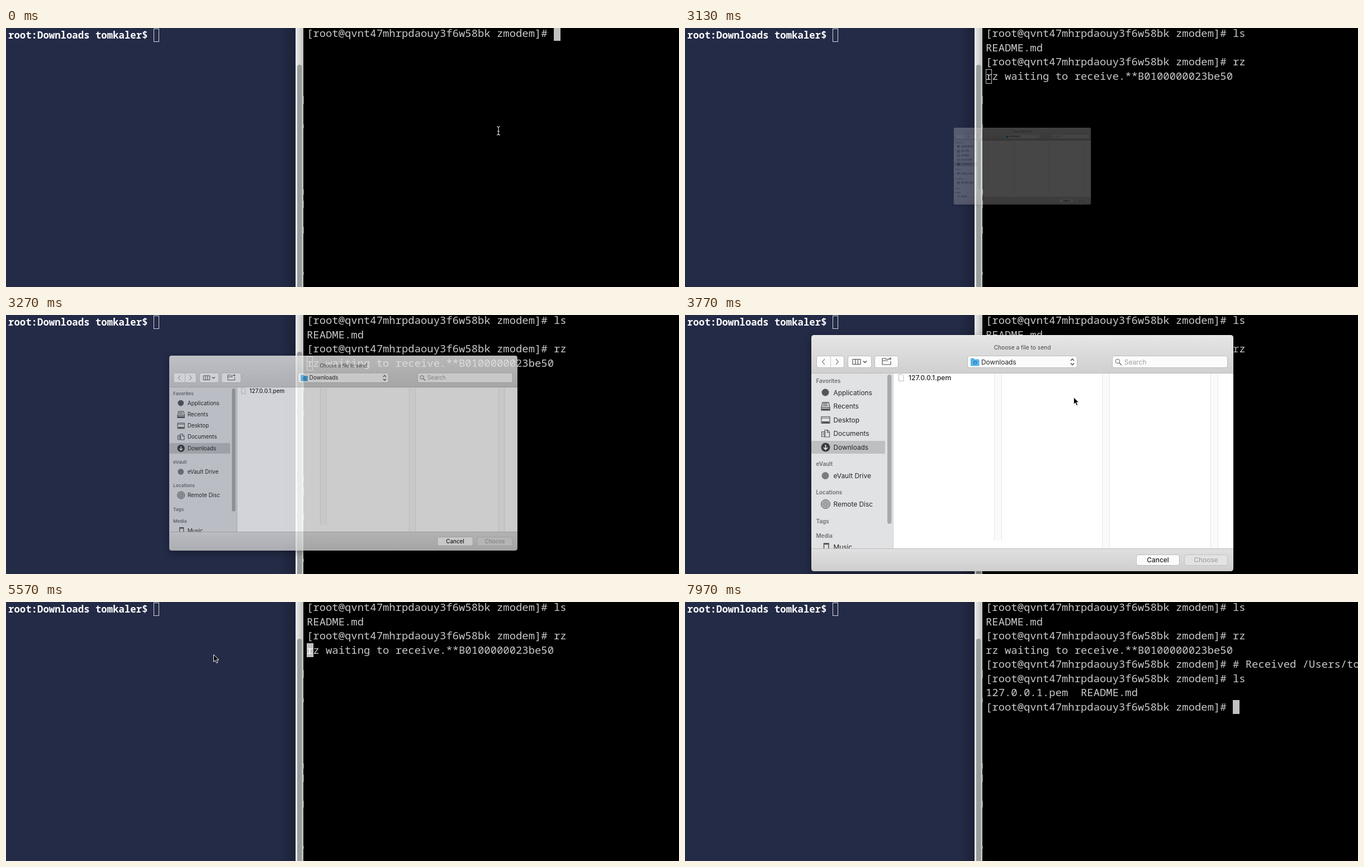
Write an HTML page that moves like this. It is 1204 px wide and 465 px high and loops after 8000 ms.

```html
<!DOCTYPE html>
<html lang="en">
<head>
<meta charset="utf-8">
<title>Sending a file to a remote shell</title>
<style>
html, body { margin: 0; width: 100%; height: 100%; overflow: hidden; background: #000; }
svg { display: block; width: 1204px; height: 465px; }
text { white-space: pre; font-family: Inter, Roboto, sans-serif; }
.mono { font-family: "Noto Sans Mono", "DejaVu Sans Mono", monospace; font-weight: 500; }
#dialog { transform-origin: 603.5px 248px; filter: drop-shadow(0 5px 8px rgba(0,0,0,.4)); }
</style>
</head>
<body>
<svg id="stage" viewBox="0 0 1204 465"></svg>
<script>
const LOOP = 8000;
const stage = document.getElementById('stage');

// Markup helpers
const rect = (x, y, w, h, fill, r = 0, stroke = 'none') =>
  `<rect x="${x}" y="${y}" width="${w}" height="${h}" rx="${r}" fill="${fill}" stroke="${stroke}"/>`;
const path = (d, stroke, width = 1, fill = 'none') =>
  `<path d="${d}" stroke="${stroke}" stroke-width="${width}" fill="${fill}"/>`;
const disc = (x, y, r, fill, stroke = 'none') =>
  `<circle cx="${x}" cy="${y}" r="${r}" fill="${fill}" stroke="${stroke}"/>`;
const text = (x, y, str, size = 11.9, fill = '#262626', weight = 400, anchor = 'start') =>
  `<text x="${x}" y="${y}" font-size="${size}" fill="${fill}" font-weight="${weight}" text-anchor="${anchor}">${str}</text>`;
const grad = (id, from, to, x2, y2) =>
  `<linearGradient id="${id}" x2="${x2}" y2="${y2}"><stop stop-color="${from}"/><stop offset="1" stop-color="${to}"/></linearGradient>`;
const button = (x, y, w, h) => rect(x + .5, y + .5, w - 1, h - 1, '#fbfbfb', 3.5, '#bcbcbc');

// Terminals
const USER = 'tomkaler';
const PROMPT = '[root@qvnt47mhrpdaouy3f6w58bk zmodem]# ';
const CHAR = 11.34, ROW = 25.5, LEFT = 538, BASE = 16.4;

const log = [
  [0, PROMPT], [700, 'l'], [900, 's'],
  [1300, '\nREADME.md\n' + PROMPT],
  [1950, 'r'], [2300, 'z'],
  [2420, '\nrz waiting to receive.**B0100000023be50\r'],
  [6200, `\n${PROMPT}# Received /Users/${USER}/Downloads/127.0.0.1.pem\n${PROMPT}`],
  [7000, 'l'], [7200, 's'],
  [7560, '\n127.0.0.1.pem  README.md\n' + PROMPT]
];

function terminals() {
  let rows = '';
  for (let i = 0; i < 8; i++)
    rows += `<text class="mono row" x="${LEFT}" y="${BASE + i * ROW}" font-size="18.9" fill="#c9c9c9"></text>`;
  return rect(0, 0, 519, 465, '#242b47') + rect(488, 0, 30, 465, 'url(#edge)') +
    `<text class="mono" x="4" y="18.8" font-size="17.33" style="font-weight:600" fill="#fff">root:Downloads ${USER}$</text>` +
    rect(264.5, 1.5, 9, 23, 'none', 0, '#d5d6dc') +
    rect(518, 0, 14, 465, 'url(#track)') + rect(521, 66, 8.5, 420, '#999c9c', 4) +
    path('M532.500 122v14M532.500 173v7M532.500 290v9M532.500 310v13M532.500 357v12M532.500 438v5', '#777') +
    `<rect id="block" height="25"/>` + rows +
    `<text id="under" class="mono" x="${LEFT}" font-size="18.9" fill="#fff"></text>`;
}

// File dialog
function sidebar() {
  const ink = '#555658';
  const heads = [['Favorites', 121.5], ['eVault', 271], ['Locations', 322], ['Tags', 373.5], ['Media', 399.5]];
  const items = [['Applications', 143.5], ['Recents', 168], ['Desktop', 192.5], ['Documents', 217],
    ['Downloads', 241.8], ['eVault Drive', 293], ['Remote Disc', 344], ['Music', 421]];
  return rect(226, 104, 147, 316, '#e1e2e4') + rect(372, 104, 1, 316, '#cfcfd1') +
    rect(226, 226, 132, 23, '#bebfc1') + rect(362, 107, 7.5, 268, '#a8a9ab', 3.7) +
    heads.map(([s, y]) => text(234.5, y, s, 9.9, '#6c6d70', 600)).join('') +
    items.map(([s, y]) => text(265.5, y, s)).join('') +
    disc(251, 139, 6.5, ink) +
    path('M246 157h11l2 9v5h-15v-5zM244 166h15M247 159.5h8M246.5 162.5h9', ink, 1.3) +
    rect(244, 168, 15, 3, ink) +
    path('M244 182.5h15v12h-15zM244 185h15', ink, 1.2) + rect(245, 191, 13, 3, ink) +
    path('M244.5 209.5h6v9h-6zM250 206.5h5l3.5 3.5v9h-8.5zM254.5 207v4h4M246 212h3M246 215h3', ink, 1.2) +
    disc(251.5, 237.5, 8, '#3b3c3e') + path('M251.5 233v8M248 238l3.5 3.5 3.5-3.5', '#e8e8e8', 1.7) +
    disc(251, 288.5, 6.5, '#7b7c7e') +
    disc(251.5, 339.5, 8, '#b3b4b6', ink) + disc(251.5, 339.5, 4.5, 'none', '#77787a') + disc(251.5, 339.5, 1.8, '#eee', ink) +
    path('M248.5 420v-10h8.5v10M248.5 411.5h8.5', ink, 1.5);
}

function toolbar() {
  return path('M226 105V41q0-5 5-5h745q5 0 5 5v64z', 'none', 0, 'url(#bar)') +
    rect(230, 36, 747, 1, '#f3f3f3') + rect(226, 104, 755, 1, '#bababa') +
    text(603.5, 61.8, 'Choose a file to send', 10.2, '#444', 400, 'middle') +
    button(235, 73, 50, 22) + rect(260, 73, 1, 22, '#c6c6c6') +
    path('M250 79l-4.5 5 4.5 5M270 79l4.5 5-4.5 5', '#848484', 1.2) +
    button(291, 73, 43, 22) + path('M300 79.5h14v9h-14zM304.7 79.5v9M309.3 79.5v9', '#4a4a4a', 1.1) +
    path('M319 82.5l3 3 3-3', '#4a4a4a', 1.4) +
    button(339, 73, 43, 22) + path('M365 79.5h-5l-1.5-1.5h-5.5v11h15v-6M353 82h10M367 76v5M364.5 78.5h5', '#4a4a4a', 1.1) +
    button(505, 73, 197, 22) +
    path('M511 79q0-1.5 1.5-1.5h4l1.5 2h7q1.5 0 1.5 1.5v9q0 1.5-1.5 1.5h-12.5q-1.5 0-1.5-1.5z', 'none', 0, '#56b4ea') +
    disc(519, 85.5, 3.4, '#2d83be') + path('M519 83.5v4M517.5 86l1.5 1.5 1.5-1.5', '#9ad8fa', .9) +
    text(530, 88.5, 'Downloads') +
    path('M690 82l3-3.2 3 3.2M690 86.5l3 3.2 3-3.2', '#4a4a4a', 1.4) +
    button(764, 73, 207, 22) + disc(774, 83, 3.8, 'none', '#606060') + path('M777 86l4 4', '#606060', 1.4) +
    text(786, 88.5, 'Search', 11.9, '#a0a0a0');
}

function columns() {
  const gutter = (x, h) => rect(x, 105, 13, h, '#fafafa') + rect(x, 105, 1, h, '#e6e6e6') + rect(x + 13, 105, 1, h, '#e6e6e6');
  const page = stroke => path('M382.5 106.5h5.5l3 3v9h-8.5z', stroke, 1, '#fff');
  const name = '127.0.0.1.pem';
  const gray = '#7b7b7b';
  return rect(373, 105, 608, 315, '#fff') + gutter(553, 300) +
    `<g id="empty">${gutter(746, 315) + gutter(940, 315)}</g>` +
    `<g id="file">${page('#b9b9b9') + text(400, 117.3, name, 12.1, '#222', 500)}</g>` +
    `<g id="chosen">` +
      rect(373, 105, 180, 16, '#0a58d2') + page('#fff') + path('M388 106.5v3h3', '#9dbbe8') +
      text(400, 117.3, name, 12.1, '#fff', 500) +
      rect(967, 105, 14, 315, '#fafafa') + rect(967, 105, 1, 315, '#e4e4e4') +
      rect(970.5, 107, 7.5, 258, '#bfbfbf', 3.7) + path('M972.5 409v7M975.5 409v7', '#a5a5a5') +
      text(766.5, 341, name, 13.9, '#262626', 400, 'middle') +
      text(767, 360, 'printable encoded archive - 2 KB', 11.2, gray, 500, 'middle') +
      text(743, 395, 'Tags', 11.2, gray, 500, 'end') + text(751, 395, 'Add Tags…', 11.2, '#bdbdbd') +
      text(743, 412, 'Created', 11.2, gray, 500, 'end') +
      text(751, 412, 'September 18, 2019 at 6:15 PM', 11.4) +
    `</g>`;
}

function footer() {
  return path('M226 420h755v35q0 5-5 5H231q-5 0-5-5z', 'none', 0, 'url(#foot)') + rect(226, 419, 755, 1, '#b9b9b9') +
    button(807, 430, 78, 20) + text(846, 444.3, 'Cancel', 11.9, '#222', 500, 'middle') +
    `<g id="off">${rect(893.5, 430.5, 77, 19, '#e3e3e3', 3.5, '#c4c4c4') + text(932, 444.3, 'Choose', 11.9, '#a4a4a4', 500, 'middle')}</g>` +
    `<g id="on">${rect(893, 430, 78, 20, 'url(#blue)', 4) + text(932, 444.3, 'Choose', 11.9, '#fff', 500, 'middle')}</g>`;
}

stage.innerHTML = '<defs>' +
  grad('edge', '#1c223800', '#1c2238', 1, 0) + grad('track', '#ececec', '#c2c2c2', 1, 0) +
  grad('bar', '#e6e6e6', '#cfcfcf', 0, 1) + grad('foot', '#e0e0e0', '#cecece', 0, 1) +
  grad('blue', '#4a90f9', '#1560ee', 0, 1) + '</defs>' + terminals() +
  `<g id="dialog">${sidebar() + columns() + toolbar() + footer()}</g>` +
  `<g id="beam">${path('M-3-7.5q3 0 3 2v11q0 2-3 2M3-7.5q-3 0-3 2v11q0 2 3 2M-2 1h4', '#ddd', 1.2)}</g>` +
  `<g id="arrow">${path('M0 0v12.8l3-2.7 2.2 4.8 2.3-1-2.2-4.7h4z', '#fff', 1, '#000')}</g>`;

const $ = id => document.getElementById(id);
const rows = [...document.querySelectorAll('.row')];
const show = (id, on) => $(id).setAttribute('display', on ? 'inline' : 'none');
const place = (id, x, y) => $(id).setAttribute('transform', `translate(${x} ${y})`);
const ramp = (t, a, b) => Math.min(1, Math.max(0, (t - a) / (b - a)));
const ease = p => p * p * (3 - 2 * p);
const mix = (a, b, p) => a + (b - a) * p;

function drawShell(t) {
  const lines = log.filter(([at]) => t >= at).map(e => e[1]).join('').split('\n');
  rows.forEach((row, i) => row.textContent = (lines[i] || '').replace('\r', ''));
  const n = lines.length - 1, last = lines[n];
  const home = last.endsWith('\r');
  const hollow = t >= 3050 && t < 4900;
  const inset = hollow ? .5 : 0;
  const block = $('block');
  block.setAttribute('x', Math.floor(LEFT + (home ? 0 : last.length * CHAR)) + inset);
  block.setAttribute('y', Math.floor(n * ROW - 2) + inset);
  block.setAttribute('width', hollow ? 10 : 12);
  block.setAttribute('fill', hollow ? 'none' : '#c1c1c1');
  block.setAttribute('stroke', hollow ? '#c1c1c1' : 'none');
  $('under').setAttribute('y', BASE + n * ROW);
  $('under').textContent = home && !hollow ? last[0] : '';
}

function drawDialog(t) {
  const grow = ramp(t, 3039, 3319);
  const alpha = grow ** 1.15 * (1 - ramp(t, 4750, 4950));
  const picked = t >= 4400;
  show('dialog', alpha > 0);
  $('dialog').style.opacity = alpha;
  $('dialog').style.transform = `scale(${grow})`;
  show('file', t >= 3190 && !picked);
  show('empty', !picked);
  show('chosen', picked);
  show('off', !picked);
  show('on', picked);
}

function drawMouse(t) {
  show('beam', t < 700);
  place('beam', 881, 184.5);
  show('arrow', t >= 3400 && t < 7000);
  const toFile = ease(ramp(t, 3420, 4150)), away = ease(ramp(t, 5080, 5500));
  place('arrow', mix(mix(879, 487.5, toFile), 371.5, away), mix(mix(177, 114.5, toFile), 94.5, away));
}

let start;
function frame(now) {
  start ??= now;
  const t = (now - start) % LOOP;
  drawShell(t);
  drawDialog(t);
  drawMouse(t);
  requestAnimationFrame(frame);
}
requestAnimationFrame(frame);
</script>
</body>
</html>
```
